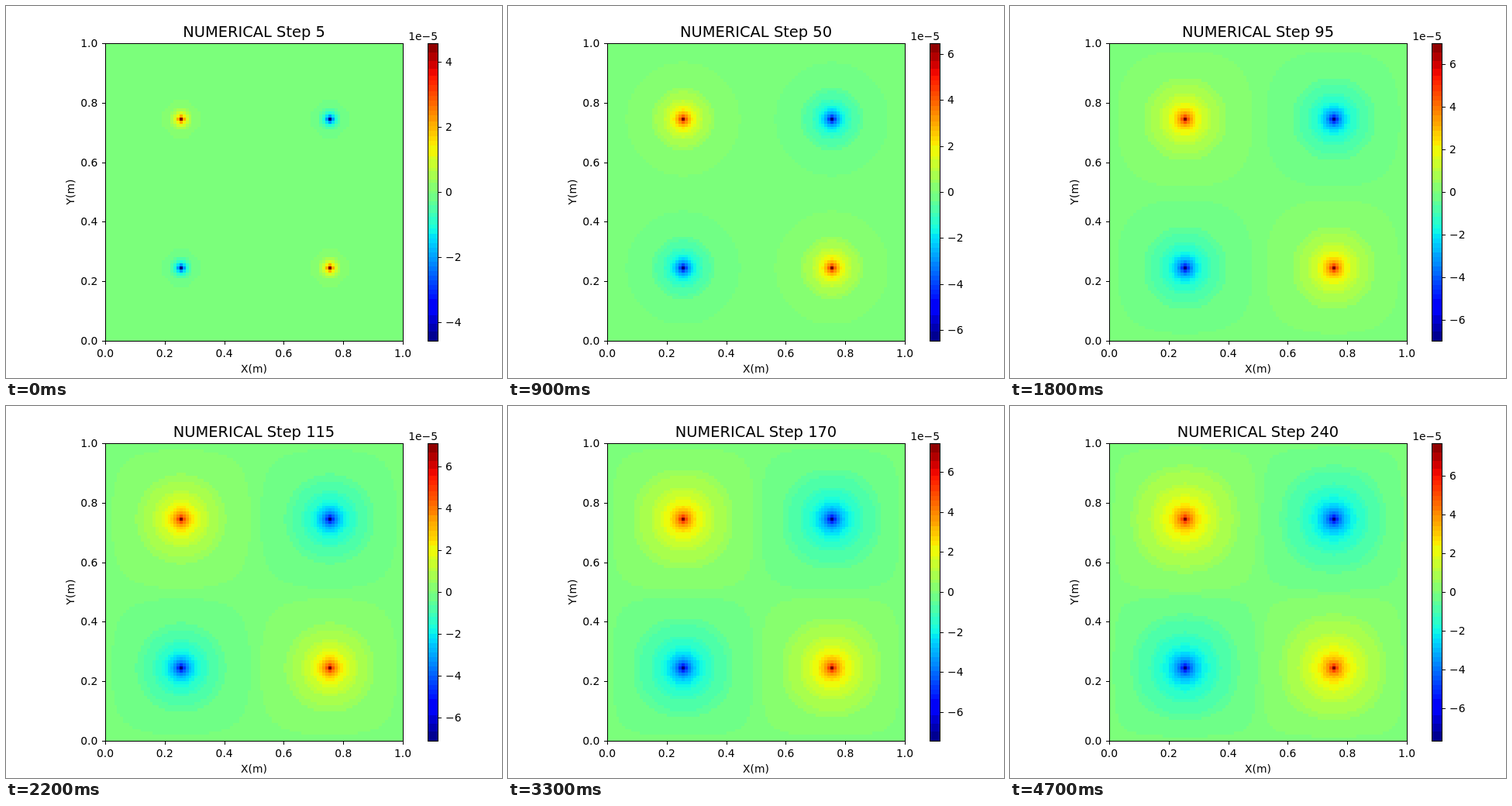
These frames come from a looping animation (640x480 px, 4.8 s). An HTML page with a canvas:

```html
<!DOCTYPE html>
<html lang="en">
<head>
<meta charset="utf-8">
<title>Numerical heat diffusion</title>
<style>
html, body { margin: 0; width: 100%; height: 100%; overflow: hidden; background: #fff; }
canvas { display: block; }
</style>
</head>
<body>
<canvas id="stage" width="640" height="480"></canvas>
<script>
const N = 100, FRAMES = 48, FRAME_MS = 100, STEPS = 5;
const SUBSTEPS = 10, RATE = 1 / SUBSTEPS;
const SOURCE = 10 * (100 / 99) ** 2;   // source times cell area, in units of 1e-5
const LEFT = 128, TOP = 48, SIZE = 384, MIDDLE = TOP + SIZE / 2;
const BAR_LEFT = 544, BAR_RIGHT = 557;

const ctx = document.getElementById('stage').getContext('2d');
const tile = document.createElement('canvas');
tile.width = tile.height = N;
const tileCtx = tile.getContext('2d');
const pixels = tileCtx.createImageData(N, N);

// Piecewise-linear jet colour map
const clamp = v => Math.max(0, Math.min(1, v));
const channel = v => Math.floor(255 * v + 1e-9);
const jet = Array.from({ length: 256 }, (_, i) => {
  const x = i / 255;
  return [
    x > 0.89 ? 1 - (x - 0.89) / 0.22 : clamp((x - 0.35) / 0.31),
    x > 0.5 ? clamp((0.91 - x) / 0.27) : clamp((x - 0.125) / 0.25),
    x < 0.11 ? 0.5 + x / 0.22 : clamp((0.65 - x) / 0.31)
  ].map(channel);
});

// Four point sources diffusing on a grid whose border stays at zero
function simulate() {
  const fields = [];
  let u = new Float64Array(N * N), next = new Float64Array(N * N);
  const sources = [[25, 25, 1], [25, 75, -1], [75, 25, -1], [75, 75, 1]];
  for (let f = 0; f < FRAMES; f++) {
    for (let s = 0; s < STEPS * SUBSTEPS; s++) {
      for (let y = 1; y < N - 1; y++) {
        for (let i = y * N + 1, end = y * N + N - 1; i < end; i++) {
          next[i] = u[i] + RATE * (u[i - 1] + u[i + 1] + u[i - N] + u[i + N] - 4 * u[i]);
        }
      }
      for (const [y, x, sign] of sources) next[y * N + x] += RATE * SOURCE * sign;
      [u, next] = [next, u];
    }
    fields.push(u.slice());
  }
  return fields;
}

// Merge similar colours into bands, each shown as its weighted mean
function bandColours(weights) {
  const bands = {};
  const keys = jet.map(([r, g, b]) => (r >> 5) * 256 + (g >> 4) * 8 + (b >> 5));
  jet.forEach((rgb, i) => {
    const sum = bands[keys[i]] ||= [0, 0, 0, 0];
    rgb.forEach((c, k) => sum[k] += c * weights[i]);
    sum[3] += weights[i];
  });
  return keys.map(k => bands[k].slice(0, 3).map(c => Math.round(c / bands[k][3])));
}

function text(str, x, y, align = 'center', size = 13.89) {
  ctx.font = size + 'px "DejaVu Sans", sans-serif';
  ctx.textAlign = align;
  ctx.fillText(str, x, y);
}

function drawField(field, max) {
  const weights = new Array(256).fill(20);
  const levels = Array.from(field, v =>
    Math.max(0, Math.min(255, Math.floor(128 + 128 * v / max))));
  for (const k of levels) weights[k] += 14.7;
  const colours = bandColours(weights);

  levels.forEach((k, i) => pixels.data.set([...colours[k], 255], i * 4));
  tileCtx.putImageData(pixels, 0, 0);
  ctx.imageSmoothingEnabled = false;
  ctx.drawImage(tile, LEFT, TOP, SIZE, SIZE);

  for (let row = 0; row < SIZE; row++) {
    const k = Math.floor((SIZE - row - 0.5) / SIZE * 256);
    ctx.fillStyle = `rgb(${colours[k]})`;
    ctx.fillRect(BAR_LEFT, TOP + row, BAR_RIGHT - BAR_LEFT, 1);
  }
}

function drawAxes(max) {
  ctx.fillStyle = ctx.strokeStyle = '#000';
  ctx.lineWidth = 1;
  ctx.strokeRect(LEFT + 0.5, TOP + 0.5, SIZE, SIZE);
  ctx.strokeRect(BAR_LEFT + 0.5, TOP + 0.5, BAR_RIGHT - BAR_LEFT, SIZE);

  const bottom = TOP + SIZE;
  for (let i = 0; i <= 5; i++) {
    const label = (i / 5).toFixed(1);
    const x = LEFT + i * SIZE / 5, y = bottom - i * SIZE / 5;
    ctx.fillRect(Math.round(x), bottom, 1, 5);
    ctx.fillRect(LEFT - 4, Math.round(y), 5, 1);
    text(label, x, bottom + 21);
    text(label, LEFT - 9.7, Math.round(y) + 5, 'right');
  }

  for (let v = -6; v <= 6; v += 2) {
    if (Math.abs(v) > max) continue;
    const y = Math.round(MIDDLE - v / max * SIZE / 2);
    ctx.fillRect(BAR_RIGHT, y, 5, 1);
    text(v < 0 ? '\u2212' + -v : v, BAR_RIGHT + 10, y + 5, 'left');
  }
  text('1e\u22125', BAR_RIGHT, 44, 'right');

  text('X(m)', 320, 473);
  ctx.save();
  ctx.translate(88, MIDDLE);
  ctx.rotate(-Math.PI / 2);
  text('Y(m)', 0, 0);
  ctx.restore();
}

const fields = simulate();
let shown = -1;

function render(now) {
  const frame = Math.floor(now / FRAME_MS) % FRAMES;
  if (frame !== shown) {
    shown = frame;
    const field = fields[frame], max = Math.max(...field);
    ctx.fillStyle = '#fff';
    ctx.fillRect(0, 0, 640, 480);
    drawField(field, max);
    drawAxes(max);
    text('NUMERICAL Step ' + (frame + 1) * STEPS, 320, 40, 'center', 19.44);
  }
  requestAnimationFrame(render);
}
render(performance.now() % FRAME_MS);
</script>
</body>
</html>
```
